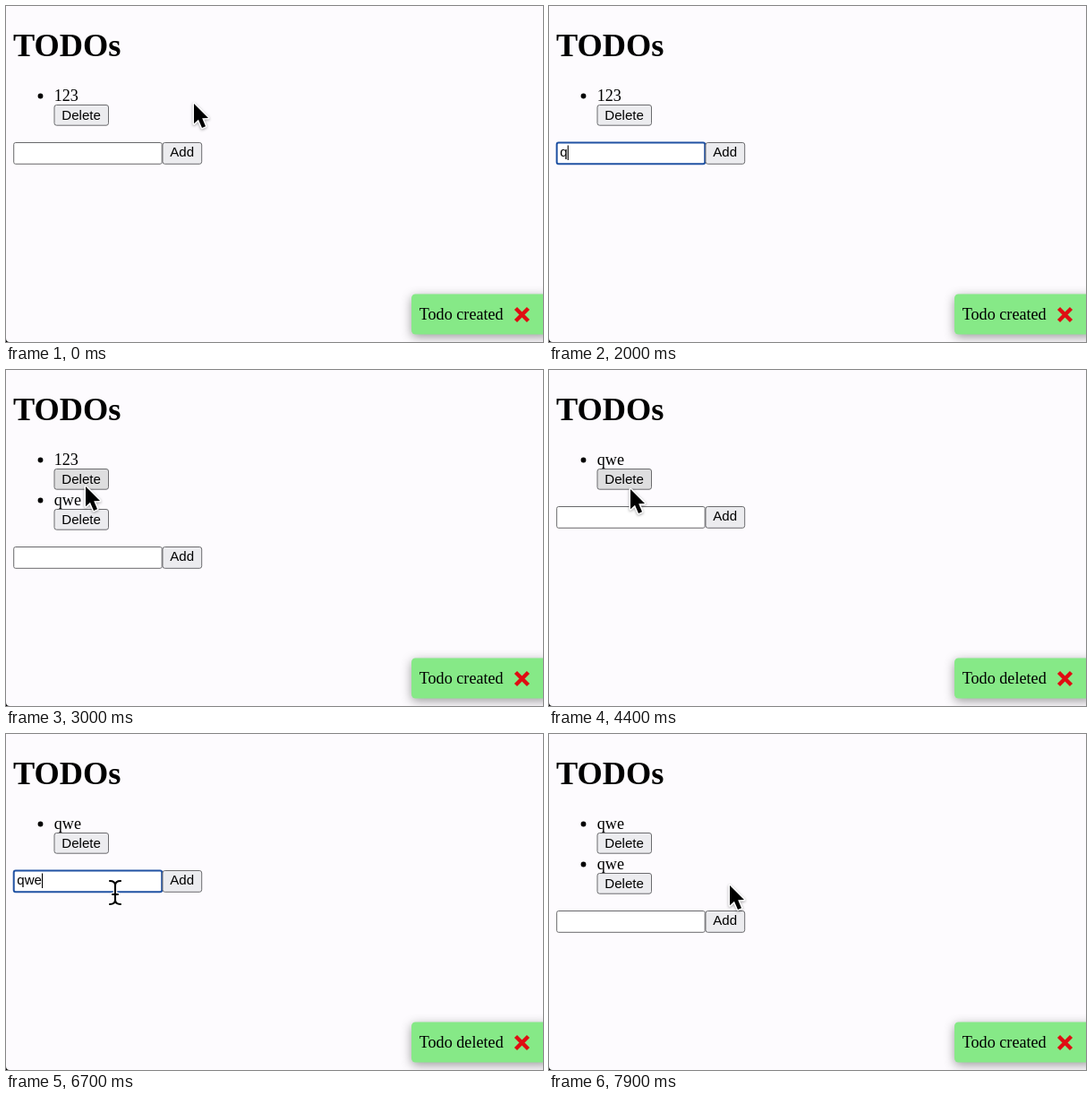
Animation, 600 px wide and 375 px high, one loop 8000 ms. Source, as an HTML page:

```html
<!DOCTYPE html>
<html lang="en">
<head>
<meta charset="utf-8">
<title>TODOs</title>
<style>
  html, body { margin: 0; width: 100%; height: 100%; overflow: hidden; background: #fdfbfe; }
  svg { display: block; width: 600px; height: 375px; }
  text { font: 18.16px "Liberation Serif", Times, serif; fill: #000; white-space: pre; }
  .title { font-size: 36.3px; font-weight: bold; }
  .ui { font: 15.1px "Liberation Sans", Arial, sans-serif; }
  .btn rect { fill: #ececef; stroke: #6b6b6e; }
  .btn.hover rect { fill: #dededf; }
  .btn.down rect { fill: #f5f5f6; }
  .field { fill: #fff; stroke: #68686b; }
  .field.focus { stroke: #2052a3; stroke-width: 2; }
  .toast { fill: #86e987; filter: drop-shadow(0 3px 6px rgba(0, 0, 0, .38)); }
  #arrow { stroke: #fff; stroke-width: 3; stroke-linejoin: round; paint-order: stroke;
    filter: drop-shadow(0 1.5px 1.5px rgba(0, 0, 0, .35)); }
  #beam { fill: none; stroke-linecap: round; }
</style>
</head>
<body>
<svg viewBox="0 0 600 375">
  <defs>
    <path id="beamShape" d="M-6-13Q0-13 0-8Q0-13 6-13M-6 13Q0 13 0 8Q0 13 6 13M0-8V8M-3 2H3"/>
  </defs>
  <text class="title" x="8" y="56">TODOs</text>
  <g class="row">
    <circle cx="38.5" cy="100.5" r="2.9"/>
    <text class="label" x="53.7" y="106"></text>
    <g class="btn">
      <rect x="54" y="110.5" width="60.5" height="22.7" rx="2.5"/>
      <text class="ui" x="62.3" y="126.7">Delete</text>
    </g>
  </g>
  <g class="row">
    <circle cx="38.5" cy="100.5" r="2.9"/>
    <text class="label" x="53.7" y="106"></text>
    <g class="btn">
      <rect x="54" y="110.5" width="60.5" height="22.7" rx="2.5"/>
      <text class="ui" x="62.3" y="126.7">Delete</text>
    </g>
  </g>
  <g id="form">
    <rect class="field" x="8.7" y="152.5" width="165.5" height="23.8" rx="2"/>
    <text class="ui" id="value" x="12.3" y="168.4"></text>
    <rect id="caret" y="155.5" width="1.1" height="16.5"/>
    <g class="btn" id="add">
      <rect x="175" y="152.5" width="43.7" height="23.8" rx="2.5"/>
      <text class="ui" x="183.2" y="168.4">Add</text>
    </g>
  </g>
  <rect class="toast" x="453" y="321.5" width="155" height="45" rx="4.5"/>
  <text id="message" x="461.7" y="350"></text>
  <path d="M569.5 337.5L583.5 351.5M583.5 337.5L569.5 351.5" stroke="#df0d12" stroke-width="4.4"/>
  <path d="M0 371Q0 375 4 375H0Z"/>
  <path id="arrow" d="M0 0V22.3L5 17.8L9 27L13 25.2L9.2 16.3L16 16Z"/>
  <g id="beam">
    <use href="#beamShape" stroke="#fff" stroke-width="4.4"/>
    <use href="#beamShape" stroke="#000" stroke-width="2.1"/>
  </g>
</svg>
<script>
const LOOP = 8000, STEP = 100, ROW = 45;

// [time, x, y] of the pointer
const path = [
  [0, 210, 109], [900, 102, 180], [1300, 98, 168], [2200, 98, 168],
  [2500, 198, 167], [2700, 198, 167], [3000, 89, 130], [3500, 90, 132],
  [4400, 91, 133], [4700, 91, 133], [5000, 90, 126], [5700, 90, 126],
  [6200, 100, 168], [6500, 100, 168], [6700, 122, 177], [7500, 202, 169],
  [LOOP, 202, 169]
];
// [time, value from then on]
const lists = [[0, ['123']], [2700, ['123', 'qwe']], [3800, ['qwe']], [7900, ['qwe', 'qwe']]];
const messages = [[0, 'Todo created'], [3800, 'Todo deleted'], [7900, 'Todo created']];
const typing = [[0, ''], [1900, 'q'], [2100, 'qw'], [2200, 'qwe'], [2700, ''],
  [6300, 'q'], [6400, 'qw'], [6500, 'qwe'], [7900, '']];
const focus = [[0, false], [1300, true], [2600, false], [6200, true], [7800, false]];
const pressed = [[0, false], [2600, true], [2700, false], [7800, true], [7900, false]];
const hidden = [[0, false], [1900, true], [2300, false], [6300, true], [6600, false]];

const $ = s => document.querySelector(s);
const rows = [...document.querySelectorAll('.row')];
const [form, field, value, caret, add, message, arrow, beam] =
  ['#form', '.field', '#value', '#caret', '#add', '#message', '#arrow', '#beam'].map(s => $(s));

const entry = (track, t) => track.filter(k => k[0] <= t).pop();
const at = (track, t) => entry(track, t)[1];
const show = (el, on) => el.setAttribute('visibility', on ? 'visible' : 'hidden');
const move = (el, x, y) => el.setAttribute('transform', `translate(${x} ${y})`);
const inside = (x, y, l, t, r, b) => x >= l && x <= r && y >= t && y <= b;

function pointer(t) {
  const i = path.findIndex(k => k[0] > t);
  const [t0, x0, y0] = path[i - 1], [t1, x1, y1] = path[i];
  const p = (t - t0) / (t1 - t0), e = p * p * (3 - 2 * p);
  return [x0 + (x1 - x0) * e, y0 + (y1 - y0) * e];
}

function draw(t) {
  const [x, y] = pointer(t);
  const list = at(lists, t), focused = at(focus, t);
  const shift = (list.length - 1) * ROW;

  rows.forEach((row, i) => {
    show(row, i < list.length);
    move(row, 0, i * ROW);
    row.querySelector('.label').textContent = list[i] || '';
    row.querySelector('.btn').classList.toggle('hover',
      inside(x, y - i * ROW, 54, 110, 115, 133.5));
  });

  move(form, 0, shift);
  field.classList.toggle('focus', focused);
  value.textContent = at(typing, t);
  const since = t - Math.max(entry(focus, t)[0], entry(typing, t)[0]);
  show(caret, focused && Math.floor(since / 500) % 2 === 0);
  caret.setAttribute('x', 12.3 + (value.textContent ? value.getComputedTextLength() : 0));
  add.classList.toggle('hover', inside(x, y - shift, 175, 152, 219, 177));
  add.classList.toggle('down', at(pressed, t));
  message.textContent = at(messages, t);

  const visible = !at(hidden, t);
  const overField = inside(x, y - shift, 8, 152, 174, 181);
  show(arrow, visible && !overField);
  show(beam, visible && overField);
  move(arrow, x, y);
  move(beam, x, y);
}

function tick() {
  const t = performance.now() % LOOP;
  draw(Math.floor(t / STEP) * STEP);
  requestAnimationFrame(tick);
}
tick();
</script>
</body>
</html>
```
